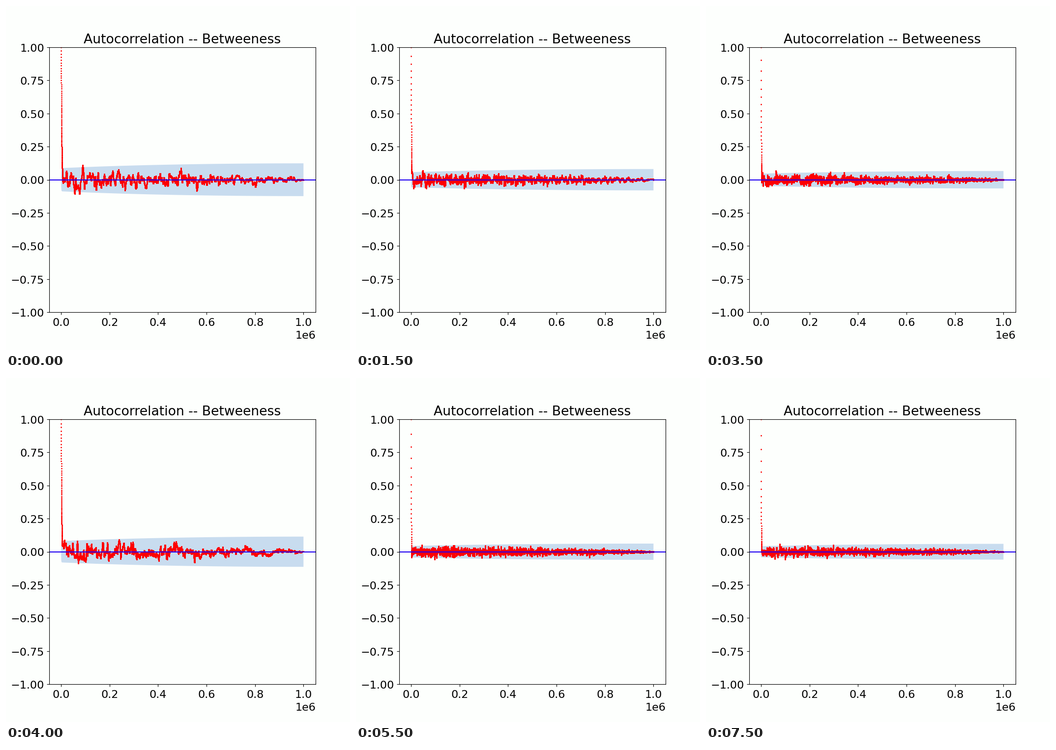
Animation, 700 px wide and 700 px high, one loop 8 s. Source, as a matplotlib script:

```python
import numpy as np
import matplotlib.pyplot as plt
from matplotlib.animation import FuncAnimation
from matplotlib.patches import Polygon
from matplotlib.transforms import ScaledTranslation

PAPER = "#fdfffd"
BAND = "#c8dcef"
ZERO_LINE = "#2000f0"

N = 20000            # lags per chain
STEP = 50            # iterations per lag
LAGS = np.arange(N)
STRETCH = 0.96       # correlations fade a little slower than exponentially
BAND_SCALE = 0.015
NOISE = 0.9

# Each group of four chains mixes faster and faster between two loss rates
GROUPS = [(0.029, 0.067), (0.040, 0.099), (0.034, 0.113), (0.034, 0.120)]
RHOS = [1 - (slow + (fast - slow) * (j / 3) ** 0.7)
        for slow, fast in GROUPS for j in range(4)]


def sample_acf(rho, rng):
    """Sample autocorrelation of a simulated first-order chain."""
    kernel = rho ** np.arange(400)
    series = np.convolve(rng.standard_normal(N + 800), kernel)[400:400 + N]
    series -= series.mean()
    power = np.abs(np.fft.rfft(series, 2 * N)) ** 2
    acf = np.fft.irfft(power)[:N]
    return acf / acf[0]


def correlation(rho, seed):
    noise = sample_acf(rho, np.random.default_rng(seed)) - rho ** LAGS
    return rho ** (LAGS ** STRETCH) + NOISE * noise


def band_outline(rho):
    """Bartlett confidence band around zero."""
    lags = LAGS[1:]
    square = rho ** 2
    start = 1 + 2 * square * (1 - square ** lags) / (1 - square)
    growth = (1 + square) / (1 - square) * (1 - (1 - lags / N) ** 2)
    half = BAND_SCALE * np.sqrt(start + growth)
    x = lags * STEP
    return np.column_stack([np.r_[x, x[::-1]], np.r_[half, -half[::-1]]])


curves = [correlation(rho, seed) for seed, rho in enumerate(RHOS)]
bands = [band_outline(rho) for rho in RHOS]

plt.rcParams.update({"font.family": "DejaVu Sans", "font.size": 16})
fig, ax = plt.subplots(figsize=(7, 7), dpi=100, facecolor=PAPER)
fig.subplots_adjust(left=0.125, right=0.9, bottom=0.11, top=0.88)
ax.set_facecolor(PAPER)
ax.set_title("Autocorrelation -- Betweeness")
ax.set_xlim(-50000, 1050000)
ax.set_ylim(-1, 1)
ax.set_yticks(np.linspace(-1, 1, 9))

# Tick labels sit slightly lower than the default layout puts them
ax.tick_params(axis="x", pad=4.9)
ax.xaxis.OFFSETTEXTPAD = 4.5
lower = ScaledTranslation(0, -0.01, fig.dpi_scale_trans)
for label in ax.get_yticklabels():
    label.set_transform(label.get_transform() + lower)

band = ax.add_patch(Polygon(bands[0], facecolor=BAND, linewidth=0))
dots, = ax.plot(LAGS * STEP, curves[0], "o", color="red", markersize=1)
ax.axhline(0, color=ZERO_LINE, linewidth=1.5)


def update(i):
    dots.set_ydata(curves[i])
    band.set_xy(bands[i])
    return dots, band


anim = FuncAnimation(fig, update, frames=len(RHOS), interval=500,
                     repeat=True, repeat_delay=0)
plt.show()
```
